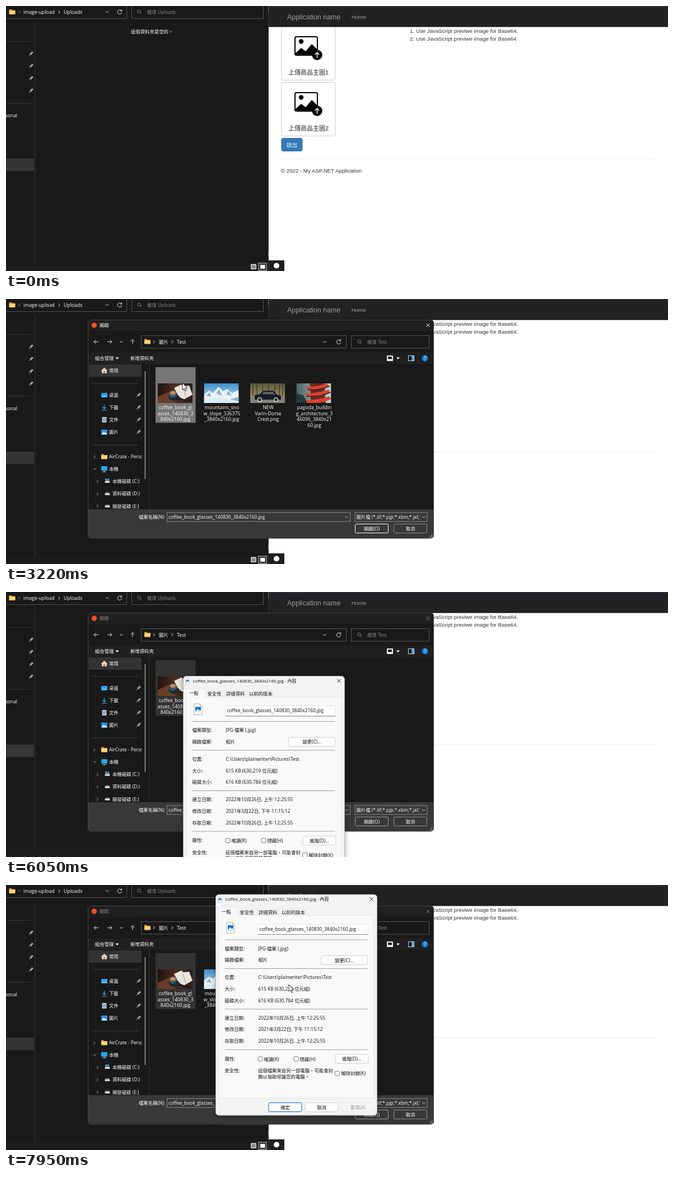
An HTML page for the animation above (8 s loop, 1182 by 474 pixels).

```html
<!DOCTYPE html>
<html lang="zh-Hant">
<head>
<meta charset="utf-8">
<title>Image upload</title>
<style>
html, body { margin: 0; width: 100%; height: 100%; overflow: hidden; background: #191919; }
svg { display: block; width: 100vw; height: 100vh; }
text { font-family: "Open Sans", "Noto Sans CJK TC", "Noto Sans CJK JP", "Noto Sans CJK", sans-serif; font-size: 8.4px; white-space: pre; }
.web text { font-family: "Liberation Sans", "Noto Sans CJK TC", "Noto Sans CJK JP", "Noto Sans CJK", sans-serif; font-size: 9.66px; }
.web .brand { font-size: 12.4px; }
.web .label { font-size: 11px; font-weight: 700; fill: #6c6c6c; }
.nav { font-size: 8.7px; }
.mid text, text.mid { text-anchor: middle; }
.line { fill: none; stroke: #e8e8e8; }
.files text { font-size: 8.6px; }

.anim { animation: 8s step-end infinite; }
#cursor { animation-name: cursor; }
#click { animation-name: click; }
#ghost { animation-name: ghost; transform-origin: 455px 232.5px; }
#dialog { animation-name: dialog; }
#menu { animation-name: menu; }
#picked { animation-name: picked; }
#filename { animation-name: filename; }
#drag { animation-name: drag; }
#props { animation-name: props; transform-origin: 144px 197px; }
.dim { animation-name: dim; }
.ring { animation-name: ring; }

@keyframes cursor {
  0% { transform: translate(680px, 490px); }
  .875% { transform: translate(677px, 462px); animation-timing-function: steps(8); }
  7.75% { transform: translate(546px, 74px); }
  27.875% { transform: translate(546px, 74px); animation-timing-function: steps(8, start); }
  34.375% { transform: translate(295px, 182px); }
  38.5% { transform: translate(295px, 182px); animation-timing-function: steps(3, start); }
  41.1% { transform: translate(315px, 150px); }
  60.5% { transform: translate(336px, 290px); }
  61.375% { transform: translate(336px, 490px); }
  78.75% { transform: translate(398px, 380px); }
  79.625% { transform: translate(414px, 240px); }
  80.75% { transform: translate(424px, 147px); }
  83.125% { transform: translate(424px, 152px); }
  84% { transform: translate(424px, 156px); }
  86.5% { transform: translate(424px, 156px); animation-timing-function: steps(4); }
  90% { transform: translate(475px, 50px); animation-timing-function: steps(4); }
  93.5% { transform: translate(482px, 25px); }
  96% { transform: translate(482px, 25px); animation-timing-function: steps(5, start); }
  99.375%, 100% { transform: translate(505px, 178px); }
}
@keyframes click {
  0%, 15.25%, 36.875%, 42.75%, 46.2%, 49.9%, 53.6%, 55.375%, 96% { opacity: 0; }
  13.625%, 36%, 41.875%, 45.25%, 49%, 52.7%, 54.625%, 86.5% { opacity: 1; }
}
@keyframes ghost {
  0% { opacity: 0; }
  20.25% { opacity: .12; transform: scale(.885); }
  21.125% { opacity: .28; transform: scale(.895); }
  22% { opacity: .46; transform: scale(.908); }
  22.875% { opacity: .75; transform: scale(.96); }
  23.75% { opacity: 1; transform: none; }
  25.375%, 100% { opacity: 0; }
}
@keyframes dialog { 0% { opacity: 0; } 24.625%, 100% { opacity: 1; } }
@keyframes menu {
  0% { opacity: 0; }
  56.25% { opacity: .4; }
  57% { opacity: .8; }
  57.875% { opacity: 1; }
  70.5%, 100% { opacity: 0; }
}
@keyframes picked {
  0% { fill: transparent; }
  33.6% { fill: #4d4d4d; }
  36% { fill: #777; }
  73%, 100% { fill: #333; }
}
@keyframes filename { 0% { opacity: 0; } 36.875%, 100% { opacity: 1; } }
@keyframes drag {
  0% { transform: translate(316.5px, 150.5px); }
  86.5% { transform: translate(316.5px, 150.5px); animation-timing-function: steps(4); }
  90% { transform: translate(364px, 51px); animation-timing-function: steps(4); }
  93.5%, 100% { transform: translate(374.5px, 17px); }
}
@keyframes props {
  0% { opacity: 0; transform: scale(.9); }
  73% { opacity: .2; transform: scale(.9); }
  73.875% { opacity: .55; transform: scale(.94); }
  74.75% { opacity: .9; transform: scale(.98); }
  75.625%, 100% { opacity: 1; transform: none; }
}
@keyframes dim { 0% { fill: #fff; stroke: #fff; } 73%, 100% { fill: #808080; stroke: #808080; } }
@keyframes ring { 0% { stroke: #fff; } 73%, 100% { stroke: #9a9a9a; } }
</style>
</head>
<body>
<svg viewBox="0 0 1182 474">
<defs>
  <g id="pin" transform="rotate(45)" fill="#aaa"><path d="M-2-4.5h4v1l-.7.5v2.4l1.7 1.6h-6l1.7-1.6v-2.4l-.7-.5zM-.5 1h1v3.5h-1z"/></g>
  <g id="folder"><path d="M-5.5-3.5q0-1 1-1h3l1.5 1.5h4.500q1 0 1 1v2h-11z" fill="#e8a33d"/><rect x="-5.500" y="-2" width="11" height="6.500" rx="1" fill="#ffd373"/></g>
  <path id="right" d="M-1.500-2.500L1.200 0L-1.500 2.500" fill="none"/>
  <path id="down" d="M-2.700-1.300L0 1.400L2.700-1.300" fill="none"/>
  <path id="left" d="M4 0H-4M-.5-3.500L-4 0L-.5 3.500" fill="none"/>
  <path id="cross" d="M-3-3L3 3M3-3L-3 3" fill="none"/>
  <g id="lens" fill="none"><circle cx="-.5" cy="-.7" r="2.700"/><path d="M1.500 1.300L4 3.800"/></g>
  <path id="reload" d="M3.200-1.800A3.800 3.800 0 1 0 3.800 .5M3.600-4.300V-1.500H.8" fill="none"/>
  <g id="disk"><path d="M-4.500 0l1.500-2.300h6l1.500 2.300z" fill="#888"/><rect x="-4.500" width="9" height="2.800" rx=".8" fill="#e4e4e4"/></g>
  <g id="upload">
    <rect x="516" y="55" width="40" height="33" rx="2.500" fill="none" stroke="#000" stroke-width="2"/>
    <circle cx="527" cy="63.500" r="4.200"/>
    <path d="M517 84l10-9 8 6 11-13 9 9v10h-38z"/>
    <circle cx="555.500" cy="87.500" r="9.300"/>
    <path d="M555.500 92.500v-9M551.800 87l3.700-3.700 3.700 3.700" fill="none" stroke="#fff" stroke-width="1.500"/>
  </g>
  <g id="photo">
    <path d="M0 0h10l4 4v15.500h-14z" fill="#fff" stroke="#9a9a9a" stroke-width=".8"/>
    <path d="M10 0v4h4" fill="#ddd" stroke="#9a9a9a" stroke-width=".6"/>
    <rect x="2" y="5.500" width="10" height="9.500" fill="#1672c4"/>
    <path d="M2 14l4-5 3 3 1.500-1.500 1.500 2v2.500h-10z" fill="#dff1ff"/>
  </g>
  <rect id="check" width="8" height="8" rx="1.500" fill="#fff" stroke="#666" stroke-width=".9"/>
  <linearGradient id="wood"><stop offset="0" stop-color="#21130d"/><stop offset=".5" stop-color="#4b2d20"/><stop offset="1" stop-color="#2a211d"/></linearGradient>
  <linearGradient id="sky" x2="0" y2="1"><stop offset="0" stop-color="#3f8fce"/><stop offset="1" stop-color="#cfe4f2"/></linearGradient>
  <linearGradient id="woods" x2="0" y2="1"><stop offset="0" stop-color="#5b5a3b"/><stop offset=".6" stop-color="#8f8562"/><stop offset="1" stop-color="#77766f"/></linearGradient>
  <linearGradient id="dusk"><stop offset="0" stop-color="#4c6668"/><stop offset="1" stop-color="#c5d5d5"/></linearGradient>
  <clipPath id="thumb"><rect width="62" height="35"/></clipPath>
  <clipPath id="side"><rect x="147" y="116" width="95.500" height="260"/></clipPath>
  <clipPath id="kinds"><rect x="623" y="383" width="116" height="15"/></clipPath>
</defs>

<!-- folder window -->
<rect width="469" height="474" fill="#191919"/>
<rect y="459" width="467" height="15" fill="#1c1c1c"/>
<path d="M468.500 0V474" stroke="#333" stroke-width="1"/>
<path d="M468.500 1v10M468.500 439v8" stroke="#777"/>
<g fill="none" stroke="#535353"><path d="M0 22.500H215.500V0M224.500 0V22.500H459.500V0"/><path d="M0 63.500H45M0 174H45M52 30V459" stroke="#383838"/></g>
<rect y="273" width="50" height="22" fill="#353535"/>
<use href="#folder" x="11" y="10.500"/>
<g stroke="#ddd"><use href="#right" x="95" y="11"/><use href="#down" x="180.500" y="10.500"/><use href="#reload" x="203" y="10.500"/></g>
<g stroke="#888"><use href="#lens" x="238" y="10.500"/><path d="M23.500 8.500l-2 2 2 2M26.500 8.500l-2 2 2 2" fill="none" stroke-width=".7"/></g>
<g fill="#fff">
  <text class="nav" x="31" y="13.700">image-upload</text>
  <text class="nav" x="103" y="13.700">Uploads</text>
  <text x="252" y="13.700" fill="#8b8b8b">搜尋 Uploads</text>
  <text x="223" y="49">這個資料夾是空的。</text>
  <text x="20" y="198.500" text-anchor="end">Personal</text>
</g>
<use href="#pin" x="0" y="0" transform="translate(44.500 85.500)"/><use href="#pin" transform="translate(44.500 107.500)"/><use href="#pin" transform="translate(44.500 129.500)"/><use href="#pin" transform="translate(44.500 151.500)"/>
<rect x="437" y="461.500" width="10" height="9.500" rx="1" fill="#ccc"/>
<path d="M438.500 464.500h7M438.500 466.500h7M438.500 468.500h7" stroke="#222" stroke-width=".8"/>
<rect x="450.500" y="459.500" width="15" height="14" fill="#555" stroke="#888"/>
<rect x="453.500" y="462.500" width="9.500" height="8" fill="#fff" stroke="#111"/>

<!-- web page -->
<g class="web">
  <rect x="469" width="713" height="474" fill="#fff"/>
  <g class="line" stroke-width="1"><rect x="492" y="36.500" width="96" height="96" rx="3" stroke="#ccc"/><rect x="492" y="136.500" width="96" height="96" rx="3" stroke="#ccc"/><path d="M491 273.500H1160" stroke="#ececec"/></g>
  <use href="#upload"/><use href="#upload" y="100"/>
  <text class="label mid" x="540" y="122.500">上傳商品主圖1</text>
  <text class="label mid" x="540" y="222.500">上傳商品主圖2</text>
  <rect x="492" y="236.500" width="37" height="23" rx="3" fill="#337ab7" stroke="#2e6da4"/>
  <text class="mid" x="510.500" y="251.500" fill="#fff">送出</text>
  <g fill="#333">
    <text x="721" y="47.500">1.</text><text x="732" y="47.500">Use JavaScript previwe image for Base64.</text>
    <text x="721" y="62">2.</text><text x="732" y="62">Use JavaScript previwe image for Base64.</text>
    <text x="491" y="298">© 2022 - My ASP.NET Application</text>
  </g>
  <rect x="469" width="713" height="37" fill="#222"/>
  <rect x="469" width="713" height="2" fill="#2c2f40"/>
  <rect x="469" y="36.500" width="713" height="1" fill="#080808"/>
  <g fill="#9d9d9d"><text class="brand" x="502" y="23.500">Application name</text><text x="617" y="23">Home</text></g>
  <rect x="469" y="455" width="28" height="19" fill="#1f1f1f"/>
  <circle cx="483" cy="464.500" r="5" fill="#fff"/>
</g>

<!-- dialog while it opens -->
<g id="ghost" class="anim" opacity="0">
  <path d="M146 58V42q0-5 5-5H759q5 0 5 5V58z" fill="#202020"/>
  <rect x="146" y="58" width="618" height="317" fill="#fff"/>
  <path d="M146 375H764V423q0 5-5 5H151q-5 0-5-5z" fill="#383838"/>
  <path d="M236 384h48v11h-48zM287.500 382h327v16.500h-327zM622 382h130v16.500h-130zM622 402h61v18h-61zM690.500 402h61.500v18h-61.500zM752 417h12v11h-12z" fill="#fff"/>
  <circle cx="157.500" cy="47" r="4.500" fill="#999"/>
  <text x="167" y="50" fill="#aaa">開啟</text>
  <use href="#cross" x="753.500" y="47" stroke="#fff"/>
</g>

<!-- open dialog -->
<g id="dialog" class="anim" opacity="0" fill="#fff">
  <rect x="146.500" y="37.500" width="617" height="390.500" rx="5" fill="#191919" stroke="#484848"/>
  <path d="M147 57V42q0-4 4-4H759q4 0 4 4V57z" fill="#202020"/>
  <rect x="147" y="95.500" width="616" height="20.500" fill="#202020"/>
  <path d="M147 376H763V423q0 4.500-4.500 4.500H151.500q-4.500 0-4.500-4.500z" fill="#383838"/>
  <circle cx="157.500" cy="47" r="4.700" fill="#f0502b"/>
  <text class="anim dim" x="167" y="50" stroke-width="0">開啟</text>
  <use class="anim dim" href="#cross" x="753.500" y="47" stroke="#fff"/>

  <g fill="none" stroke="#555"><rect x="241.500" y="65.500" width="366" height="22.500"/><rect x="616.500" y="65.500" width="139" height="22.500"/></g>
  <g stroke="#ddd">
    <use href="#left" x="161" y="76.500"/><use href="#left" transform="translate(185 76.500) scale(-1 1)"/>
    <use href="#down" x="206" y="76.500"/><use href="#left" transform="translate(226 76.500) rotate(90)"/>
    <use href="#right" x="264.500" y="76.500"/><use href="#right" x="297" y="76.500"/>
    <use href="#down" x="569" y="76.500"/><use href="#reload" x="594" y="76.500"/>
    <use href="#lens" x="631" y="76.500" stroke="#888"/>
  </g>
  <use href="#folder" x="252.500" y="76"/>
  <text x="273" y="79.500">圖片</text><text class="nav" x="305" y="79.500">Test</text>
  <text x="645" y="79.500" fill="#8b8b8b">搜尋 Test</text>

  <text x="159" y="109">組合管理</text><text x="222" y="109">新增資料夾</text>
  <path d="M195.500 104.500h6l-3 3.500zM697 104.500h6l-3 3.500z"/>
  <rect x="680.500" y="101.500" width="10" height="9" fill="#fff" stroke="#ddd"/><rect x="682" y="103" width="7" height="4.500" fill="#222"/>
  <rect x="718.500" y="101.500" width="10" height="9" fill="#111" stroke="#ddd"/><rect x="724" y="102" width="4" height="8" fill="#35a4ea"/>
  <circle cx="748" cy="106" r="5.500" fill="#1483d8"/><text class="mid" x="748" y="109">?</text>

  <g clip-path="url(#side)">
    <rect x="148" y="117" width="94" height="22" fill="#333"/>
    <path d="M154 151H237M154 261H237" stroke="#3c3c3c"/>
    <path d="M170 128l5.500-5 5.500 5-1 1v4h-9v-4z" fill="#d9d2cb"/><path d="M174 129h3v4h-3z" fill="#e07a3f"/><path d="M169.500 128.500l6-5.500 6 5.500" fill="none" stroke="#e5895b"/>
    <rect x="170" y="168" width="11" height="8" rx="1" fill="#2ba3e8"/><path d="M171 174h9" stroke="#cdefff" stroke-width=".8"/>
    <path d="M175.500 189v7M172.500 193.500l3 3 3-3M171 199h9" fill="none" stroke="#3fa9e0" stroke-width="1.200"/>
    <rect x="171.500" y="211" width="8" height="10" rx="1" fill="#b7c7d8"/><path d="M173 214h5M173 216h5M173 218h5" stroke="#4c7396" stroke-width=".8"/>
    <rect x="170" y="233.500" width="11" height="9.500" rx="1" fill="#2a8fe0"/><path d="M170.500 242l4-5 3 3 1-1 2 3z" fill="#e6f5ff"/>
    <use href="#folder" x="175.500" y="282"/>
    <rect x="170" y="299" width="11" height="8" rx="1" fill="#2ba3e8"/><path d="M172 309h7M175.500 307v2" stroke="#ccc"/>
    <use href="#disk" x="181" y="326"/><path d="M177 321h3v3h-3zM181 321h3v3h-3z" fill="#2ba3e8"/>
    <use href="#disk" x="181" y="348"/><use href="#disk" x="181" y="370"/>
    <g stroke="#aaa"><use href="#right" x="158" y="282.500"/><use href="#down" x="158" y="304"/><use href="#right" x="163.500" y="326.500"/><use href="#right" x="163.500" y="348.500"/><use href="#right" x="163.500" y="370.500"/></g>
    <text x="184" y="131">常用</text><text x="184" y="175">桌面</text><text x="184" y="197">下載</text><text x="184" y="219">文件</text><text x="184" y="241">圖片</text>
    <text x="184" y="285">AirCrate - Personal</text><text x="184" y="307">本機</text>
    <text x="190" y="329">本機磁碟 (C:)</text><text x="190" y="351">資料磁碟 (D:)</text><text x="190" y="373.500">開發磁碟 (E:)</text>
    <use href="#pin" transform="translate(236.500 172)"/><use href="#pin" transform="translate(236.500 194)"/><use href="#pin" transform="translate(236.500 216)"/><use href="#pin" transform="translate(236.500 238)"/>
  </g>
  <path d="M248.500 129V322" stroke="#9a9a9a" stroke-width="1.600"/>
  <path d="M256 116V376" stroke="#333"/>

  <rect id="picked" class="anim" x="267" y="122" width="71.500" height="99.500" fill="transparent"/>
  <g transform="translate(271 151)" clip-path="url(#thumb)">
    <rect width="62" height="35" fill="url(#wood)"/>
    <path d="M0 24l22-10 10 21H0z" fill="#6b3d26"/>
    <path d="M29 8l13-6 4 3 10-1 6 16-16 9-9-6z" fill="#e9e4dc"/><path d="M44 5l6 20" stroke="#a79d92"/>
    <ellipse cx="29" cy="25" rx="10" ry="6" fill="#1d2a36"/><ellipse cx="27" cy="19" rx="7" ry="6.500" fill="#35566d"/><ellipse cx="27" cy="17" rx="5" ry="3.500" fill="#c98a4f"/>
    <path d="M36 30q6-5 12 0t12-1" fill="none" stroke="#111" stroke-width="1.500"/>
  </g>
  <g transform="translate(353.500 151)" clip-path="url(#thumb)">
    <rect width="62" height="35" fill="url(#sky)"/>
    <path d="M0 20l9-7 7 4 10-11 8 8 7-4 9 7 12-5v23H0z" fill="#e9f1f7"/>
    <path d="M4 22l6-6 3 8zM22 18l5-8 5 12zM40 20l3-7 7 9zM6 35l20-9 14 5 22-7v11z" fill="#8fb0cb"/>
    <path d="M0 30q20-9 62 2v3H0z" fill="#dcebf6"/>
  </g>
  <g transform="translate(436 151)" clip-path="url(#thumb)">
    <rect width="62" height="35" fill="url(#woods)"/>
    <path d="M5 0v22M12 0v20M22 0v18M33 0v16M44 0v18M52 0v20M58 0v22" stroke="#453f2d" stroke-width="1.500"/>
    <path d="M0 25h62v10H0z" fill="#85827b"/>
    <path d="M8 29V21l9-2 7-6h17l7 7 7 2v7z" fill="#171c22"/><path d="M20 19l5-4h15l5 5z" fill="#55606a"/>
    <circle cx="17" cy="29" r="4"/><circle cx="46" cy="29" r="4"/><g fill="#333"><circle cx="17" cy="29" r="3"/><circle cx="46" cy="29" r="3"/></g>
  </g>
  <g transform="translate(518.500 151)" clip-path="url(#thumb)">
    <rect width="62" height="35" fill="url(#dusk)"/>
    <path d="M0 35V18l12 3 8 14z" fill="#26383a"/>
    <path d="M24 0h26l2 35H26z" fill="#6e2720"/>
    <path d="M17 6Q38 6 54 0l5 5Q40 13 20 11zM15 18q22 0 42-7l4 5q-20 9-43 7zM17 30q22 0 42-7l3 5q-20 9-43 7z" fill="#d84530"/>
    <path d="M20 11q20 2 39-6M18 23q22 2 43-7" fill="none" stroke="#3a1d1b" stroke-width="1.500"/>
  </g>
  <g class="files mid">
    <text x="302.500" y="197">coffee_book_gl</text><text x="302.500" y="207.500">asses_140830_3</text><text x="302.500" y="218">840x2160.jpg</text>
    <text x="385.500" y="197">mountains_sno</text><text x="385.500" y="207.500">w_slope_336375</text><text x="385.500" y="218">_3840x2160.jpg</text>
    <text x="468" y="197">NEW</text><text x="468" y="207.500">Varin-Dorse</text><text x="468" y="218">Crest.png</text>
    <text x="550.500" y="197">pagoda_buildin</text><text x="550.500" y="207.500">g_architecture_3</text><text x="550.500" y="218">46096_3840x21</text><text x="550.500" y="228.500">60.jpg</text>
  </g>

  <g fill="none" stroke="#8c8c8c">
    <rect x="287.500" y="382" width="327" height="16"/><rect x="623" y="382" width="129" height="16"/>
    <rect x="692.500" y="402.500" width="59" height="16" rx="2.500"/>
    <rect class="anim ring" x="623.500" y="402.500" width="59" height="16" rx="2.500" stroke="#fff"/>
  </g>
  <text x="284" y="393" text-anchor="end">檔案名稱(N):</text>
  <text id="filename" class="anim" x="290" y="393">coffee_book_glasses_140830_3840x2160.jpg</text>
  <text x="625.500" y="393" clip-path="url(#kinds)">圖片檔 (*.tif;*.pjp;*.xbm;*.jxl;*.svg)</text>
  <g stroke="#ccc"><use href="#down" x="608" y="390"/><use href="#down" x="746" y="390"/></g>
  <text class="mid" x="653" y="413.500">開啟(O)</text><text class="mid" x="722" y="413.500">取消</text>
  <path d="M760 421h1.500M758 423.500h1.500M760 423.500h1.500M756 426h1.500M758 426h1.500M760 426h1.500" stroke="#bbb"/>
</g>

<!-- context menu -->
<g id="menu" class="anim" opacity="0" fill="#fff">
  <rect x="315.500" y="149.500" width="232" height="340" fill="#2b2b2b" stroke="#777"/>
  <path d="M320 249H543M320 313H543M320 381H543M320 445H543" stroke="#606060"/>
  <text x="340" y="166">選取(S)</text><text x="340" y="184">編輯(E)</text><text x="340" y="202">列印(P)</text><text x="340" y="220">向右旋轉(T)</text><text x="340" y="238">向左旋轉(L)</text>
  <text x="340" y="266">開啟檔案(H)</text><text x="340" y="284">共用</text><text x="340" y="302">還原舊版(V)</text>
  <text x="340" y="330">傳送到(N)</text><text x="340" y="350">剪下(T)</text><text x="340" y="370">複製(C)</text>
  <text x="340" y="398">建立捷徑(S)</text><text x="340" y="416">刪除(D)</text><text x="340" y="434">重新命名(M)</text><text x="340" y="463">內容(R)</text>
  <g stroke="#ddd"><use href="#right" x="538" y="263"/><use href="#right" x="538" y="327"/></g>
</g>

<!-- properties window -->
<g id="drag" class="anim">
<g id="props" class="anim" opacity="0" fill="#111" style="filter:drop-shadow(0 2px 4px #0006)">
  <rect width="288" height="395" rx="5.500" fill="#f3f3f3" stroke="#b4b4b4" stroke-width=".8"/>
  <rect x="5.500" y="37.500" width="277" height="326.500" fill="#f9f9f9" stroke="#e5e5e5"/>
  <path d="M39.500 25.500H72.500V37M72.500 25.500H113.500V37M113.500 25.500H160.500V37" class="line"/>
  <path d="M5.500 38V22.500H39.500V38" fill="#f9f9f9" stroke="#e5e5e5"/>
  <use href="#photo" transform="translate(4 4) scale(.5)"/><use href="#photo" transform="translate(19.500 49.500)"/>
  <text x="17" y="11.300" style="font-size:7.900px">coffee_book_glasses_140830_3840x2160.jpg - 內容</text>
  <use href="#cross" x="278" y="8.500" stroke="#222"/>
  <text x="10.500" y="33.500">一般</text><text x="43" y="34.500">安全性</text><text x="76.500" y="34.500">詳細資料</text><text x="117.500" y="34.500">以前的版本</text>
  <rect x="75" y="53" width="197" height="18.500" rx="2" fill="#fff" stroke="#e3e3e3"/><path d="M75 71.500H272" stroke="#868686"/>
  <text x="78" y="64.500">coffee_book_glasses_140830_3840x2160.jpg</text>
  <path d="M16 81H271M16 132.500H271M16 205H271M16 277.500H271" stroke="#a0a0a0"/>
  <g>
    <text x="16" y="99.500">檔案類型:</text><text x="76" y="99.500">JPG 檔案 (.jpg)</text>
    <text x="16" y="120">開啟檔案:</text><text x="76" y="120">相片</text>
    <text x="16" y="151">位置:</text><text x="76" y="151">C:\Users\plainwriter\Pictures\Test</text>
    <text x="16" y="172">大小:</text><text x="76" y="172">615 KB (630,219 位元組)</text>
    <text x="16" y="192.500">磁碟大小:</text><text x="76" y="192.500">616 KB (630,784 位元組)</text>
    <text x="16" y="223.500">建立日期:</text><text x="76" y="223.500">2022年10月26日, 上午 12:25:55</text>
    <text x="16" y="244">修改日期:</text><text x="76" y="244">2021年3月22日, 下午 11:15:12</text>
    <text x="16" y="265">存取日期:</text><text x="76" y="265">2022年10月26日, 上午 12:25:55</text>
    <text x="16" y="296.500">屬性:</text><text x="86" y="297.500">唯讀(R)</text><text x="150" y="297.500">隱藏(H)</text>
    <text x="16" y="318">安全性:</text><text x="75.500" y="318">這個檔案來自另一部電腦，可能會封</text><text x="75.500" y="328.500">鎖以協助保護您的電腦。</text>
    <text x="224" y="323">解除封鎖(K)</text>
  </g>
  <use href="#check" x="75.500" y="290"/><use href="#check" x="139.500" y="290"/><use href="#check" x="213" y="316"/>
  <g fill="#fdfdfd" stroke="#cfcfcf">
    <rect x="188" y="109.500" width="83" height="16" rx="2.500"/><rect x="213.500" y="286" width="59" height="16" rx="2.500"/>
    <rect x="159.500" y="372.500" width="59" height="16" rx="2.500"/><rect x="225" y="372.500" width="58" height="16" rx="2.500" fill="#f5f5f5" stroke="#e8e8e8"/>
    <rect x="94.500" y="372.500" width="59" height="16" rx="2.500" stroke="#0067c0"/>
  </g>
  <g class="mid"><text x="229.500" y="120.500">變更(C)...</text><text x="243" y="297">進階(D)...</text><text x="124" y="383.500">確定</text><text x="189" y="383.500">取消</text><text x="254" y="383.500" fill="#999">套用(A)</text></g>
</g>
</g>

<g id="cursor" class="anim" transform="translate(680 490)">
  <circle id="click" class="anim" r="9" fill="#dcae14" fill-opacity=".92" opacity="0"/>
  <path d="M0 0V12.500L2.900 9.800L4.900 14.500L6.800 13.700L4.800 9.100H8.800Z" fill="#fff" stroke="#000" stroke-width=".8"/>
</g>
</svg>
</body>
</html>
```
